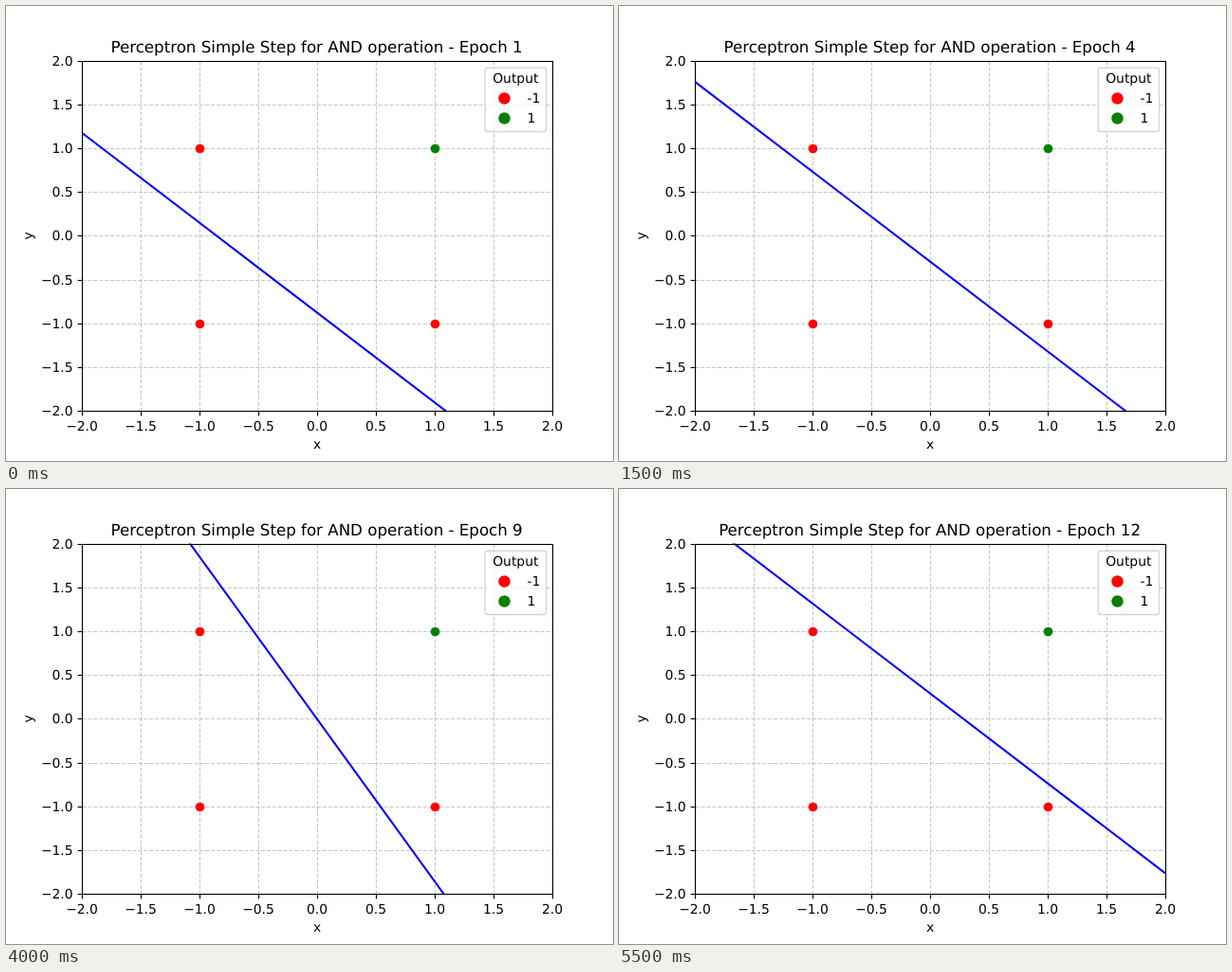
These frames come from a looping animation (640 by 480 pixels, 6 s). An HTML page:

```html
<!DOCTYPE html>
<html lang="en">
<head>
<meta charset="utf-8">
<title>Perceptron</title>
<style>
  html, body { margin: 0; width: 100%; height: 100%; overflow: hidden; background: #fff; }
  svg { display: block; width: 640px; height: 480px; }
  text { font: 13.889px "DejaVu Sans", sans-serif; text-rendering: geometricPrecision; }
  #title { font-size: 16.667px; }
  .mid { text-anchor: middle; }
  .end { text-anchor: end; }
  .grid { stroke: #b0b0b0; stroke-opacity: .7; stroke-width: 1.111; stroke-dasharray: 4.111 1.778; }
  .axis { stroke: #000; stroke-width: 1.111; fill: none; }
  #boundary { stroke: #00f; stroke-width: 2.083; }
</style>
</head>
<body>
<svg viewBox="0 0 640 480">
  <clipPath id="plot"><rect x="80" y="57.6" width="496" height="369.6"/></clipPath>
  <g id="grid"></g>
  <g id="points"></g>
  <g clip-path="url(#plot)"><line id="boundary"/></g>
  <rect class="axis" x="80.5" y="58.5" width="496" height="369"/>
  <g id="ticks"></g>
  <text id="title" class="mid" x="327.6" y="49"></text>
  <text class="mid" x="328" y="467">x</text>
  <text class="mid" transform="translate(28 242.5) rotate(-90)">y</text>
  <g id="legend">
    <rect x="505.2" y="65.3" width="64.4" height="67.2" rx="2.78"
          fill="#fff" stroke="#ccc" stroke-width="1.389" opacity=".8"/>
    <text class="mid" x="537.3" y="81">Output</text>
    <circle cx="525.5" cy="97.5" r="6.25" fill="red"/>
    <text x="549.6" y="102">-1</text>
    <circle cx="525.5" cy="118.5" r="6.25" fill="green"/>
    <text x="549.6" y="123">1</text>
  </g>
</svg>
<script>
  const STEP = 500, EPOCHS = 12;
  const $ = id => document.getElementById(id);
  const px = x => 328 + 124 * x;
  const py = y => 242.4 - 92.4 * y;
  const snap = v => Math.floor(v + 0.5) + 0.5;

  function add(parent, tag, attrs, text) {
    const el = document.createElementNS("http://www.w3.org/2000/svg", tag);
    for (const k in attrs) el.setAttribute(k, attrs[k]);
    if (text) el.textContent = text;
    $(parent).appendChild(el);
  }

  function segment(parent, cls, x1, y1, x2, y2) {
    add(parent, "line", { class: cls, x1, y1, x2, y2 });
  }

  for (let v = -2; v <= 2; v += 0.5) {
    const x = snap(px(v)), y = snap(py(v));
    const label = v.toFixed(1).replace("-", "\u2212");
    segment("grid", "grid", x, 427.5, x, 58.5);
    segment("grid", "grid", 80.5, y, 576.5, y);
    segment("ticks", "axis", x, 427.5, x, 432.4);
    segment("ticks", "axis", 80.5, y, 75.6, y);
    add("ticks", "text", { class: "mid", x: px(v), y: 448 }, label);
    add("ticks", "text", { class: "end", x: 70.6, y: y + 4.5 }, label);
  }

  for (const x of [-1, 1])
    for (const y of [-1, 1])
      add("points", "circle", {
        cx: snap(px(x)), cy: snap(py(y)), r: 4.86,
        fill: x + y === 2 ? "green" : "red"
      });

  // Decision boundaries y = slope * x + offset, each used from a given epoch on
  const boundaries = [
    { from: 1, slope: -1.0265, offset: -0.877 },
    { from: 3, slope: -0.572, offset: -0.4535 },
    { from: 4, slope: -1.0265, offset: -0.294 },
    { from: 7, slope: -1.854, offset: -0.003 },
    { from: 12, slope: -1.0265, offset: 0.29 }
  ];

  let shown = 0;
  function show(epoch) {
    if (epoch === shown) return;
    shown = epoch;
    $("title").textContent = "Perceptron Simple Step for AND operation - Epoch " + epoch;
    const b = boundaries.filter(b => b.from <= epoch).pop();
    [-2, 2].forEach((x, i) => {
      $("boundary").setAttribute("x" + (i + 1), px(x));
      $("boundary").setAttribute("y" + (i + 1), py(b.slope * x + b.offset));
    });
  }

  function tick() {
    show(Math.floor(performance.now() / STEP) % EPOCHS + 1);
    requestAnimationFrame(tick);
  }
  tick();
</script>
</body>
</html>
```
